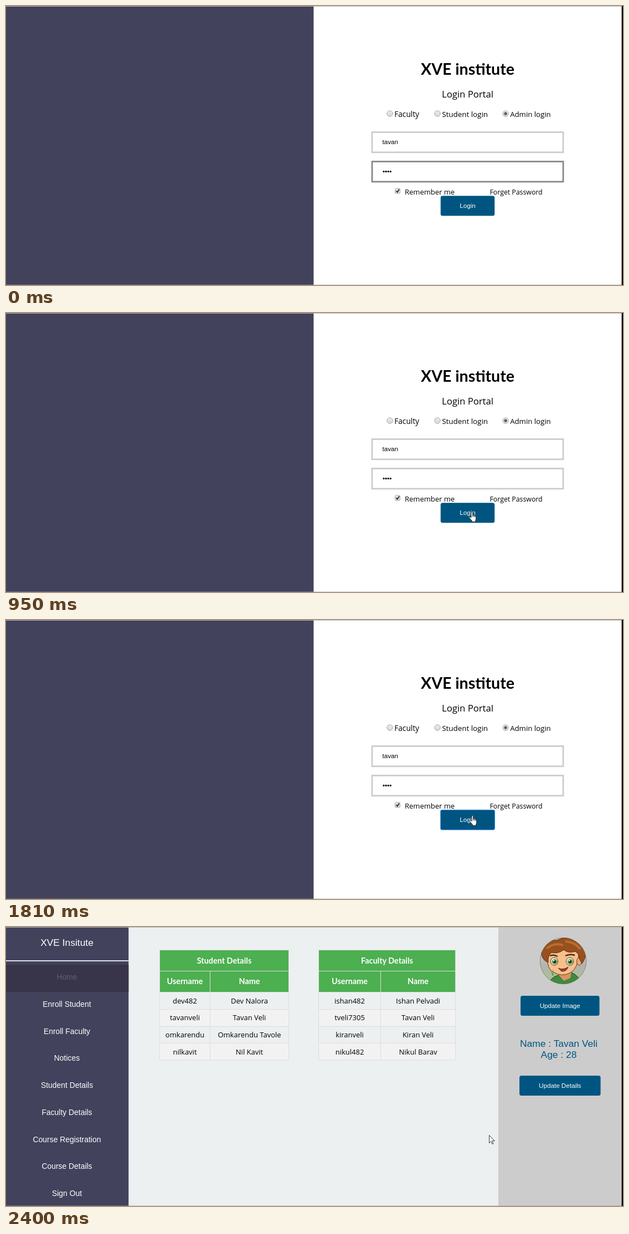
Animation of 1114x503 px, one loop 2430 ms. Source, as an HTML page:

```html
<!DOCTYPE html>
<html lang="en">
<head>
<meta charset="utf-8">
<title>Login portal</title>
<style>
  html, body { margin: 0; width: 100%; height: 100%; overflow: hidden; background: #fff; }
  svg { display: block; width: 100vw; height: 100vh; }
  text { font: 13px "Open Sans", "Noto Sans", sans-serif; }
  .mid { text-anchor: middle; }
  .ui { font: 11.65px "Liberation Sans", Arial, sans-serif; }
  .menu { font-size: 13.9px; }
  .large { font-size: 17.4px; }
  .bold { font: 700 14.4px Lato, "Open Sans", sans-serif; }
</style>
</head>
<body>
<svg id="stage" viewBox="0 0 1114 503">
  <defs>
    <linearGradient id="knob" x2="0" y2="1">
      <stop stop-color="#ededed"/><stop offset="1" stop-color="#d6d6d6"/>
    </linearGradient>
    <linearGradient id="scene" x2="0" y2="1">
      <stop offset=".25" stop-color="#cccccc"/><stop offset=".6" stop-color="#b4b3ad"/><stop offset="1" stop-color="#a5c78c"/>
    </linearGradient>
    <clipPath id="round"><circle cx="1006" cy="61" r="42"/></clipPath>
  </defs>
  <g id="login"></g>
  <g id="dashboard"></g>
  <path d="M0 .5H1112" stroke="#b5b5b5"/>
  <path d="M0 502.5H1112" stroke="#999" stroke-opacity=".5"/>
  <rect x="1111.6" width="2.4" height="503"/>
  <path id="arrow" d="M.5 .5V14.4L3.7 11.4 6 16.4 8 15.5 5.8 10.6H10.3Z" fill="#fff" stroke="#222" stroke-width=".9"/>
  <g id="hand" stroke="#222" stroke-width=".9" stroke-linejoin="round">
    <path fill="#fff" d="M4 11V2Q4 .6 5.3 .6T6.6 2V6.5Q7.8 5.8 8.7 7 10 6.4 10.8 7.8 12.5 7.4 12.6 9.5V13Q12.5 15 11.5 16.5V18.4H5.4V16.8Q3 14.5 1 11.6 .2 10 1.4 9.5 2.6 9.4 4 11Z"/>
    <path fill="none" d="M6.6 6.5V9.6M8.7 7V9.8M10.8 7.8V10"/>
  </g>
</svg>
<script>
const LOOP = 2430, PAGE_CHANGE = 1970, PRESS = 1700;
const $ = id => document.getElementById(id);
const NAVY = '#42425c', BLUE = '#005580', GREEN = '#4caf50';

const rect = (x, y, w, h, fill, extra = '') =>
  `<rect x="${x}" y="${y}" width="${w}" height="${h}" fill="${fill}" ${extra}/>`;
const text = (x, y, str, cls = '', extra = '') =>
  `<text x="${x}" y="${y}" class="${cls}" ${extra}>${str}</text>`;
const sized = px => `style="font-size:${px}px"`;
const button = (x, y, w, label) =>
  rect(x, y, w, 36, BLUE, 'rx="3.5"') + text(x + w / 2, y + 21.7, label, 'ui mid', 'fill="#fff"');
const radio = (x, label, size, checked) =>
  `<circle cx="${x}" cy="194" r="5.2" fill="url(#knob)" stroke="#aaa"/>` +
  (checked ? `<circle cx="${x}" cy="194" r="2.7" fill="#605c66"/>` : '') +
  text(x + 8.2, 199.7, label, '', sized(size));
const field = (y, id) =>
  rect(661, y + 1.4, 345, 36.4, '#fff', `id="${id}" stroke="#ccc" stroke-width="2.8"`);

function loginPage() {
  const dots = [0, 1, 2, 3].map(i => `<circle cx="${682 + 4.1 * i}" cy="298.4" r="1.6"/>`).join('');
  return rect(0, 0, 1114, 503, '#fff') + rect(0, 0, 555.4, 503, NAVY) +
    text(833.5, 123.5, 'XVE institute', 'bold mid', sized(28.5)) +
    text(833.5, 164.6, 'Login Portal', 'mid', sized(16.7)) +
    radio(693, 'Faculty', 13.7) + radio(779, 'Student login', 13.4) + radio(902, 'Admin login', 13.2, true) +
    field(226, 'user') + field(279, 'password') +
    text(679.5, 249.3, 'tavan', 'ui') + dots +
    rect(702.5, 328.9, 9, 9, 'url(#knob)', 'rx="1.5" stroke="#a5a5a5"') +
    '<path d="M704.5 333.2L706.5 335.6 710 330.4" fill="none" stroke="#333" stroke-width="1.9"/>' +
    text(720, 339.6, 'Remember me') + text(873.5, 339.6, 'Forget Password', '', sized(12.3)) +
    button(784.7, 342.2, 97.5, 'Login') +
    rect(784.5, 342.3, 98, 36, 'none', 'id="ring" rx="2" stroke="#4a90f0"');
}

function table(x, split, right, title, rows) {
  const mid = (x + right) / 2, left = (x + split) / 2, name = (split + right) / 2;
  const rowTop = i => 117 + 30.75 * i;
  const white = 'fill="#fff"';
  let out = rect(x, 41, right - x, 76, GREEN) +
    text(mid, 65.7, title, 'bold mid', white) +
    text(left, 103.3, 'Username', 'bold mid', white) + text(name, 103.3, 'Name', 'bold mid', white);
  let lines = `M${x} 41.5H${right}V240H${x}ZM${x} 79.5H${right}M${split} 79.5V240`;
  rows.forEach(([user, person], i) => {
    const y = rowTop(i);
    if (i % 2) out += rect(x, y, right - x, 30.75, '#f2f2f2');
    out += text(left, y + 20.5, user, 'mid') + text(name, y + 20.5, person, 'mid');
    lines += `M${x} ${Math.round(y) + .5}H${right}`;
  });
  return out + `<path d="${lines}" fill="none" stroke="#ddd"/>`;
}

function avatar() {
  const eye = x => `<ellipse cx="${x}" cy="62" rx="6.6" ry="7" fill="#fff" stroke="#4b2814"/>
    <circle cx="${x + .5}" cy="62.5" r="5" fill="#62a044"/><circle cx="${x + .5}" cy="62.5" r="2.5" fill="#1e2a17"/>
    <circle cx="${x - 1}" cy="60.5" r="1.3" fill="#fff"/>`;
  return `<g clip-path="url(#round)">
    <circle cx="1006" cy="61" r="42" fill="url(#scene)"/>
    <path d="M979 104Q984 90 997 87L1021 82Q1035 88 1040 104Z" fill="#3f8a3c" stroke="#333022"/>
    <path d="M995 83L1021 80 1019 92 1007 97Z" fill="#d99464"/>
    <path d="M978 54Q976 76 989 82 1004 90 1018 83 1033 75 1034 49L1019 36 988 40Z" fill="#f6c08c" stroke="#6b391c"/>
    <ellipse cx="1035" cy="62" rx="4.5" ry="7" fill="#edaa75" stroke="#6b391c"/>
    ${eye(990)}${eye(1018)}
    <path d="M982 52Q988 49 996 53M1010 52Q1018 48 1027 51" fill="none" stroke="#552b14" stroke-width="2.4"/>
    <path d="M997 74Q1006 78 1015 72 1012 81 1003 80Z" fill="#a33c2a" stroke="#52241a" stroke-width=".8"/>
    <path d="M967 50Q965 38 974 34 979 22 994 24 1010 16 1027 23 1043 25 1046 39 1050 51 1040 66L1035 57Q1035 48 1028 44 1015 48 1007 41 997 49 985 46 978 50 979 64 969 60 967 50Z" fill="#98501f" stroke="#5b2d13"/>
    <path d="M976 39Q990 27 1006 33M1010 26Q1027 27 1037 40" fill="none" stroke="#bd6c2f" stroke-width="4"/>
    <path d="M984 80L988 88M988 78L987 88" stroke="#57823d"/>
  </g><circle cx="1006" cy="61" r="41.7" fill="none" stroke="#6e6c60" stroke-width=".7"/>`;
}

function dashboardPage() {
  const menu = ['Home', 'Enroll Student', 'Enroll Faculty', 'Notices', 'Student Details',
    'Faculty Details', 'Course Registration', 'Course Details', 'Sign Out'];
  const items = menu.map((label, i) =>
    text(110, 95.2 + 48.75 * i, label, 'ui menu mid', `fill="${i ? '#fff' : '#615d73'}"`)).join('');
  const profile = `fill="${BLUE}"`;
  return rect(0, 0, 1114, 503, '#ecf0f1') + rect(0, 0, 221.3, 503, NAVY) +
    rect(889, 0, 223, 503, '#ccc') +
    text(110, 33.7, 'XVE Insitute', 'ui large mid', 'fill="#fff"') +
    rect(0, 60, 221.3, 1.8, '#f1f1f1') + rect(0, 68, 221.3, 49, '#38344a') + items +
    table(277.5, 368.5, 510.5, 'Student Details', [
      ['dev482', 'Dev Nalora'], ['tavanveli', 'Tavan Veli'],
      ['omkarendu', 'Omkarendu Tavole'], ['nilkavit', 'Nil Kavit']]) +
    table(564.5, 676.5, 811.5, 'Faculty Details', [
      ['ishan482', 'Ishan Pelvadi'], ['tveli7305', 'Tavan Veli'],
      ['kiranveli', 'Kiran Veli'], ['nikul482', 'Nikul Barav']]) +
    avatar() + button(929, 124, 142.5, 'Update Image') +
    text(998, 216, 'Name : Tavan Veli', 'ui large mid', profile) +
    text(998, 235.6, 'Age : 28', 'ui large mid', profile) +
    button(927, 268, 146.5, 'Update Details');
}

// Pointer hot spot: time, x, y
const path = [
  [310, 1026, 505], [400, 980, 464], [540, 896, 402], [660, 871, 388], [760, 856, 374],
  [950, 841, 358], [1040, 838, 358], [1080, 839, 358], [1200, 839, 358], [1420, 842, 352],
  [2170, 842, 352], [2400, 872, 375]
];

function pointerAt(t) {
  const i = path.findIndex(p => p[0] >= t);
  if (i < 0) return path[path.length - 1].slice(1);
  if (i === 0) return path[0].slice(1);
  const [t0, x0, y0] = path[i - 1], [t1, x1, y1] = path[i];
  const p = (t - t0) / (t1 - t0);
  return [x0 + (x1 - x0) * p, y0 + (y1 - y0) * p];
}

const show = (el, on) => el.setAttribute('visibility', on ? 'visible' : 'hidden');

$('login').innerHTML = loginPage();
$('dashboard').innerHTML = dashboardPage();

function render(t) {
  const loggedIn = t >= PAGE_CHANGE;
  show($('login'), !loggedIn);
  show($('dashboard'), loggedIn);
  show($('ring'), !loggedIn && t >= PRESS);

  // The password border finishes losing its focus colour.
  const rest = 1 - Math.min(1, t / 320);
  const grey = Math.round(204 - 68 * rest * rest);
  $('password').setAttribute('stroke', `rgb(${grey},${grey},${grey})`);

  const [x, y] = pointerAt(t);
  const onLink = t > 660 && t < 2200 && y < 378;
  show($('hand'), onLink);
  show($('arrow'), !onLink && t > path[0][0]);
  $('hand').setAttribute('transform', `translate(${x - 5} ${y})`);
  $('arrow').setAttribute('transform', `translate(${x} ${y})`);
}

const start = performance.now();
function tick() {
  render((performance.now() - start) % LOOP);
  requestAnimationFrame(tick);
}
render(0);
requestAnimationFrame(tick);
</script>
</body>
</html>
```
